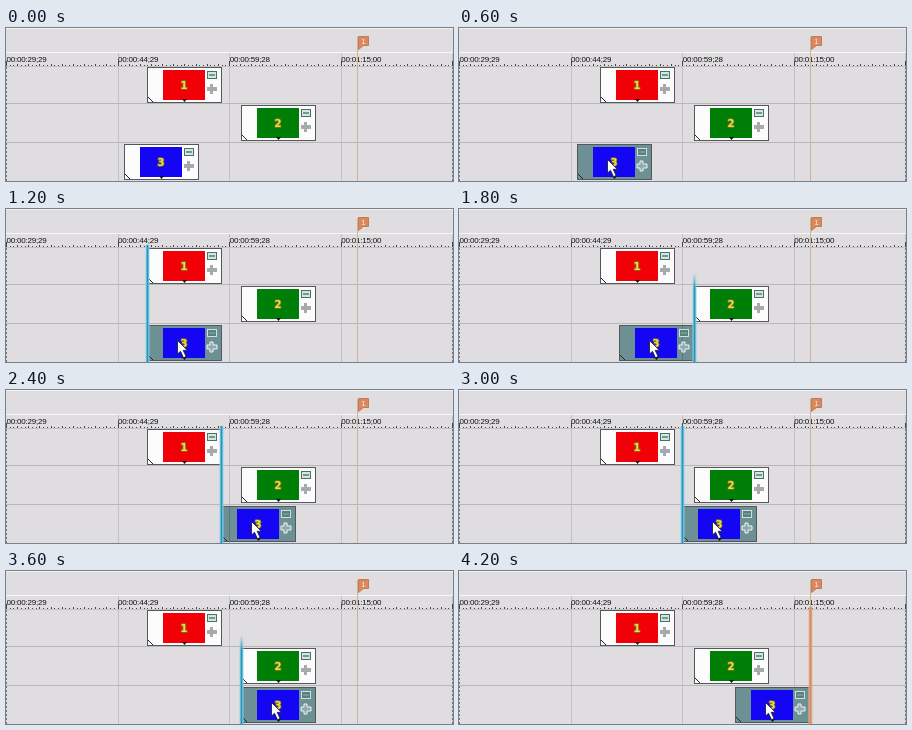
An HTML page for the animation above (5400 ms loop, 447 by 153 pixels).

```html
<!DOCTYPE html>
<html lang="en">
<head>
<meta charset="utf-8">
<title>Timeline snapping</title>
<style>
html, body { margin: 0; width: 100%; height: 100%; overflow: hidden; background: #dfdddf; }
svg { display: block; width: 447px; height: 153px; }
text { font-family: "Liberation Sans", Arial, sans-serif; }
.time { font-size: 8px; letter-spacing: -.2px; fill: #111; }
.num { font: bold 10px "DejaVu Sans", sans-serif; text-anchor: middle; fill: #eade48; stroke: #85761c; stroke-width: 1.6px; stroke-linejoin: round; paint-order: stroke; }
.body { fill: #fcfcfc; stroke: #55585a; }
.film { fill: #d5e6de; stroke: #4b6f69; }
.cross { fill: #a5aaac; stroke: none; }
.held .body { fill: #6c9094; }
.held .film { fill: #587f82; stroke: #cfe0dd; }
.held .cross { fill: #91aaad; stroke: #eef4f4; }
</style>
</head>
<body>
<svg viewBox="0 0 447 153">
  <defs>
    <linearGradient id="fade" gradientUnits="userSpaceOnUse" x1="0" y1="64" x2="0" y2="80">
      <stop offset="0" stop-color="#fff" stop-opacity="0"/>
      <stop offset="1" stop-color="#fff"/>
    </linearGradient>
    <mask id="fadeMask" maskUnits="userSpaceOnUse" x="-10" y="36" width="20" height="117">
      <rect x="-10" y="36" width="20" height="117" fill="url(#fade)"/>
    </mask>
  </defs>
  <g id="stage"></g>
</svg>
<script>
const NS = "http://www.w3.org/2000/svg";
const stage = document.getElementById("stage");

function add(parent, tag, attrs, text) {
  const el = document.createElementNS(NS, tag);
  for (const key in attrs) el.setAttribute(key, attrs[key]);
  if (text) el.textContent = text;
  parent.appendChild(el);
  return el;
}
const box = (parent, x, y, width, height, fill) =>
  add(parent, "rect", { x, y, width, height, fill });
const path = (parent, d, fill) => add(parent, "path", { d, fill });
const move = (el, x, y = 0) => el.setAttribute("transform", `translate(${x} ${y})`);
const show = (el, on) => el.setAttribute("visibility", on ? "visible" : "hidden");

function drawBackground() {
  box(stage, 0, 0, 447, 153, "#dfdddf");
  box(stage, 0, 0, 447, 1, "#f3f2f3");
  box(stage, 0, 24, 447, 1, "#f8f7f8");
  for (const x of [112, 223, 335, 446]) box(stage, x, 25, 1, 128, "#c2c0ca");
  for (const y of [75, 114]) box(stage, 0, y, 447, 1, "#b9b7ba");
  box(stage, 0, 38, 447, 1, "#c4c2c5");
  add(stage, "path", { d: "M.5 39V153M446.5 39V153", stroke: "#77757a", "stroke-dasharray": "2 2" });

  const step = 111.5 / 30;
  for (let i = 0; i <= 120; i++) {
    const h = i % 30 === 0 ? 5 : i % 3 === 0 ? 2 : 1;
    box(stage, Math.round(i * step), 38 - h, 1, h, "#444");
  }
  ["00:00:29;29", "00:00:44;29", "00:00:59;28", "00:01:15;00"].forEach((label, i) =>
    add(stage, "text", { class: "time", x: .5 + i * 111.6, y: 34 }, label));
}

function drawClip(y, color, label) {
  const g = add(stage, "g", {});
  add(g, "rect", { class: "body", x: .5, y: y + .5, width: 74, height: 35 });
  const grid = box(g, 0, y + 1, 1, 34, "#587b80");
  box(g, 16, y + 3, 42, 30, color);
  add(g, "text", { class: "num", x: 37, y: y + 22 }, label);
  path(g, `M35 ${y + 32}h5l-2.5 3z`, "#111");
  add(g, "path", { d: `M1 ${y + 30}l5 5`, stroke: "#222", fill: "none" });

  add(g, "rect", { class: "film", x: 60.5, y: y + 4.5, width: 9, height: 7 });
  box(g, 62, y + 7, 6, 2, "#6f9d8c");
  add(g, "path", {
    class: "cross",
    d: `M60 ${y + 20}h3v-3h3v3h4v4h-4v3h-3v-3h-3z`,
    "stroke-width": 1
  });

  return (x, held) => {
    move(g, x);
    g.setAttribute("class", held ? "held" : "");
    grid.setAttribute("x", 223 - x);
    show(grid, held && x < 223 && x + 74 > 223);
  };
}

function drawGlow(outer, mid, core) {
  const g = add(stage, "g", {});
  const inner = add(g, "g", {});
  add(inner, "rect", { x: -2, y: 36, width: 5, height: 117, fill: outer, opacity: .45 });
  box(inner, -1, 36, 3, 117, mid);
  box(inner, 0, 36, 1, 117, core);
  return { g, inner };
}

drawBackground();
drawClip(39, "#f20008", "1")(141, false);
drawClip(77, "#007f08", "2")(235, false);
box(stage, 351, 9, 1, 144, "#d0b294");
add(stage, "path", { d: "M352.5 8.5h10v9h-5l-5 4z", fill: "#d9895d", stroke: "#c07c55" });
add(stage, "text", { x: 357.4, y: 16, "font-size": 8, "text-anchor": "middle", fill: "#fbe9dc" }, "1");
const setClip = drawClip(116, "#1405f5", "3");
const blue = drawGlow("#8fd3e8", "#62bddb", "#2b93b8");
const orange = drawGlow("#e8b79b", "#dfa17c", "#d48c62");
move(orange.g, 351);
const cursor = add(stage, "path", {
  d: "M0 0V13.5l3-2.7 3 6.4 2.6-1.2-2.9-6.2h4.2z",
  fill: "#fff", stroke: "#1c2530", "stroke-width": .9, "stroke-linejoin": "round"
});

// Each pose: clip start, snap line position, whether the line fades in lower down
const poses = [
  { x: 118 },
  { x: 118, held: true },
  { x: 141, held: true, snap: 141 },
  { x: 160, held: true, snap: 235, low: true },
  { x: 215, held: true, snap: 215 },
  { x: 223, held: true, snap: 223 },
  { x: 235, held: true, snap: 235, low: true },
  { x: 276, held: true, marker: true }
];

function render(ms) {
  const pose = poses[Math.min(7, Math.floor(ms % 5400 / 600))];
  setClip(pose.x, !!pose.held);
  show(cursor, pose.held);
  move(cursor, pose.x + 30.5, 131.5);
  show(blue.g, pose.snap);
  move(blue.g, pose.snap || 0);
  blue.inner.setAttribute("mask", pose.low ? "url(#fadeMask)" : "none");
  show(orange.g, pose.marker);
}

const start = performance.now();
function tick() {
  render(performance.now() - start);
  requestAnimationFrame(tick);
}
tick();
</script>
</body>
</html>
```
